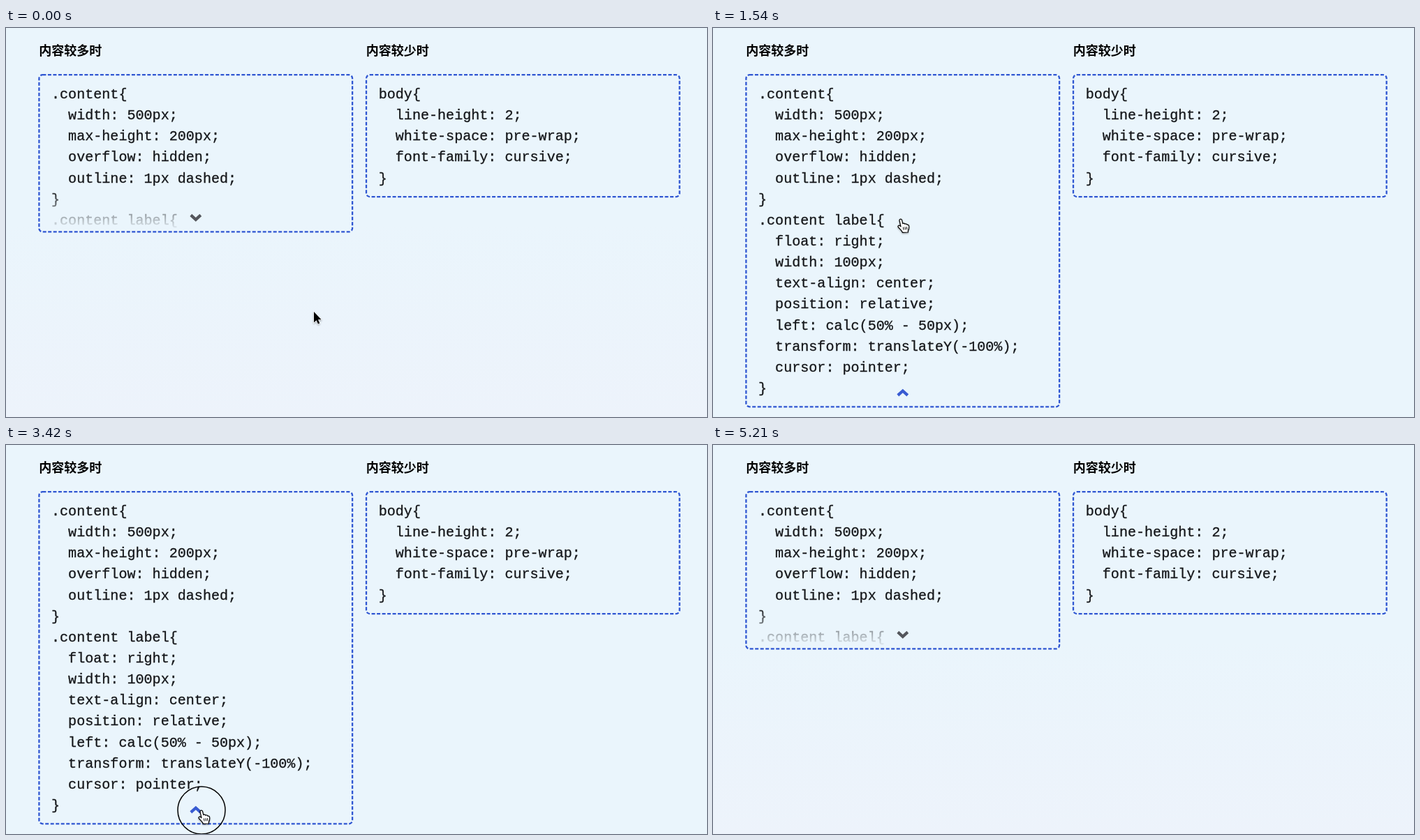
These frames come from a looping animation (1004x558 px, 5.33 s). An HTML page:

```html
<!DOCTYPE html>
<html lang="zh-CN">
<head>
<meta charset="utf-8">
<title>展开与收起</title>
<style>
  html, body { margin: 0; width: 100%; height: 100%; overflow: hidden; background: #eaf5fc; }
  svg { display: block; width: 100%; height: 100%; }
  .title { font: 700 18px "Noto Sans CJK SC", "Noto Sans CJK", sans-serif; fill: #000; }
  .code text {
    font: 20.09px "Courier New", "Liberation Mono", monospace; white-space: pre;
    fill: #15171a; stroke: #15171a; stroke-width: .3;
  }
  .box { fill: none; stroke: #2f56d2; stroke-width: 2.3; stroke-dasharray: 5 2.5; }
</style>
</head>
<body>
<svg viewBox="0 0 1004 558">
  <defs>
    <linearGradient id="sky" x1="0" y1="0" x2="0" y2="1">
      <stop offset=".5" stop-color="#eaf5fc"/>
      <stop offset="1" stop-color="#edf3fb"/>
    </linearGradient>
    <linearGradient id="fade" gradientUnits="userSpaceOnUse" x1="0" y1="231" x2="0" y2="291">
      <stop offset="0" stop-color="#fff"/>
      <stop offset="1" stop-color="#000"/>
    </linearGradient>
    <mask id="veil" maskUnits="userSpaceOnUse" x="0" y="0" width="1004" height="558">
      <rect width="1004" height="558" fill="url(#fade)"/>
    </mask>
    <filter id="shade" x="-50%" y="-50%" width="200%" height="200%">
      <feDropShadow dx="0" dy="1.2" stdDeviation="1" flood-opacity=".35"/>
    </filter>
  </defs>
  <rect id="dusk" width="1004" height="558" fill="url(#sky)"/>
  <text class="title" x="47.3" y="38.5">内容较多时</text>
  <text class="title" x="515.7" y="38.5">内容较少时</text>
  <g id="long" class="code"></g>
  <g id="short" class="code"></g>
  <rect id="frame" class="box" x="47.4" y="67.2" width="448.7" height="225.1" rx="5"/>
  <rect class="box" x="516" y="67.2" width="448.7" height="174.9" rx="5"/>
  <path id="chevron" d="M-7-3.2L0 3.2L7-3.2" fill="none" stroke-width="4.2"/>
  <g id="cursor">
    <circle id="ring" r="34" fill="none" stroke="#000" stroke-width="1.5"/>
    <path id="arrow" filter="url(#shade)" d="M0 0V15.6L3.6 12.2L5.9 17.5L8.3 16.5L6 11.3H10.6Z"
      fill="#000" stroke="#fff" stroke-width="1.2" paint-order="stroke"/>
    <g id="hand" filter="url(#shade)" stroke="#000" stroke-width="1.2" stroke-linejoin="round">
      <path fill="#fff" d="M-2 2.2C-2.2-.2 1-.6 1.6 1.6L2.8 6.6C3.8 5.8 5.4 6 5.9 7.3C7 6.6 8.5 7 8.9 8.3
        C10.3 7.8 11.5 8.6 11.6 10C12 13 11.4 15 10.4 16.6V19L2.6 19.4C1.4 16.6-1.2 14.4-3.4 12
        C-5 10.2-3 8.4-1.2 9.8L0 10.8Z"/>
      <path fill="none" stroke-width="1" d="M3.4 11.6L4.1 15.6M6 11.3L6.5 15.3M8.5 11.2L8.8 15"/>
    </g>
  </g>
</svg>
<script>
const LOOP = 5330, TICK = 1000 / 24, LINE = 30.14;
const $ = id => document.getElementById(id);

const longCode = `.content{
  width: 500px;
  max-height: 200px;
  overflow: hidden;
  outline: 1px dashed;
}
.content label{
  float: right;
  width: 100px;
  text-align: center;
  position: relative;
  left: calc(50% - 50px);
  transform: translateY(-100%);
  cursor: pointer;
}`;
const shortCode = `body{
  line-height: 2;
  white-space: pre-wrap;
  font-family: cursive;
}`;

function typeset(group, code, x) {
  code.split("\n").forEach((line, i) => {
    const text = document.createElementNS("http://www.w3.org/2000/svg", "text");
    text.setAttribute("x", x);
    text.setAttribute("y", 101 + i * LINE);
    text.textContent = line;
    group.append(text);
  });
}
typeset($("long"), longCode, 65);
typeset($("short"), shortCode, 533.7);

const ramp = (t, from, to) => Math.min(1, Math.max(0, (t - from) / (to - from)));
const smooth = p => p * p * (3 - 2 * p);
const speedUp = p => p * p;

const home = { x: 441, y: 407 };
const moves = [
  { from: 0, to: 990, x: 269, y: 274, ease: smooth },
  { from: 2000, to: 2930, x: 280, y: 524, ease: smooth },
  { from: 4000, to: 4420, x: 530, y: 440, ease: speedUp },
  { from: 4625, to: 4710, x: 646, y: 268, ease: speedUp }
];
const LEAVE = 4745;

// Each visit to the label: pointer enters, presses, releases
const visits = [
  { enter: 750, press: 1125, release: 1540 },
  { enter: 2740, press: 3083, release: 3500 }
];

function pointer(t) {
  let { x, y } = home;
  for (const m of moves) {
    const p = m.ease(ramp(t, m.from, m.to));
    x += (m.x - x) * p;
    y += (m.y - y) * p;
  }
  return { x, y };
}

const set = (id, name, value) => $(id).setAttribute(name, value);
const show = (id, on) => set(id, "visibility", on ? "visible" : "hidden");

function draw(time) {
  const t = Math.round(Math.floor((time % LOOP + 5) / TICK) * TICK);
  const open = t >= visits[0].release && t < visits[1].release;
  const hand = visits.some(v => t >= v.enter && t < v.release + 80);
  const pressed = visits.some(v => t >= v.press && t < v.release);
  const glow = visits.reduce((sum, v) => sum + ramp(t, v.enter, v.enter + 210)
    - ramp(t, v.release + 40, v.release + 168), 0);

  set("frame", "height", open ? 476.1 : 225.1);
  set("long", "mask", open ? "none" : "url(#veil)");
  set("dusk", "fill", open ? "#eaf5fc" : "url(#sky)");

  const mix = (a, b) => Math.round(a + (b - a) * glow);
  set("chevron", "stroke", `rgb(${mix(84, 56)},${mix(86, 91)},${mix(92, 210)})`);
  set("chevron", "transform", open ? "translate(271.8 523.7) scale(1 -1)" : "translate(271.8 271.6)");

  const { x, y } = pointer(t);
  set("cursor", "transform", `translate(${x.toFixed(1)} ${y.toFixed(1)})`);
  show("arrow", !hand && t < LEAVE);
  show("hand", hand);
  show("ring", pressed);
}

const start = performance.now();
function tick() {
  draw(performance.now() - start);
  requestAnimationFrame(tick);
}
tick();
</script>
</body>
</html>
```
